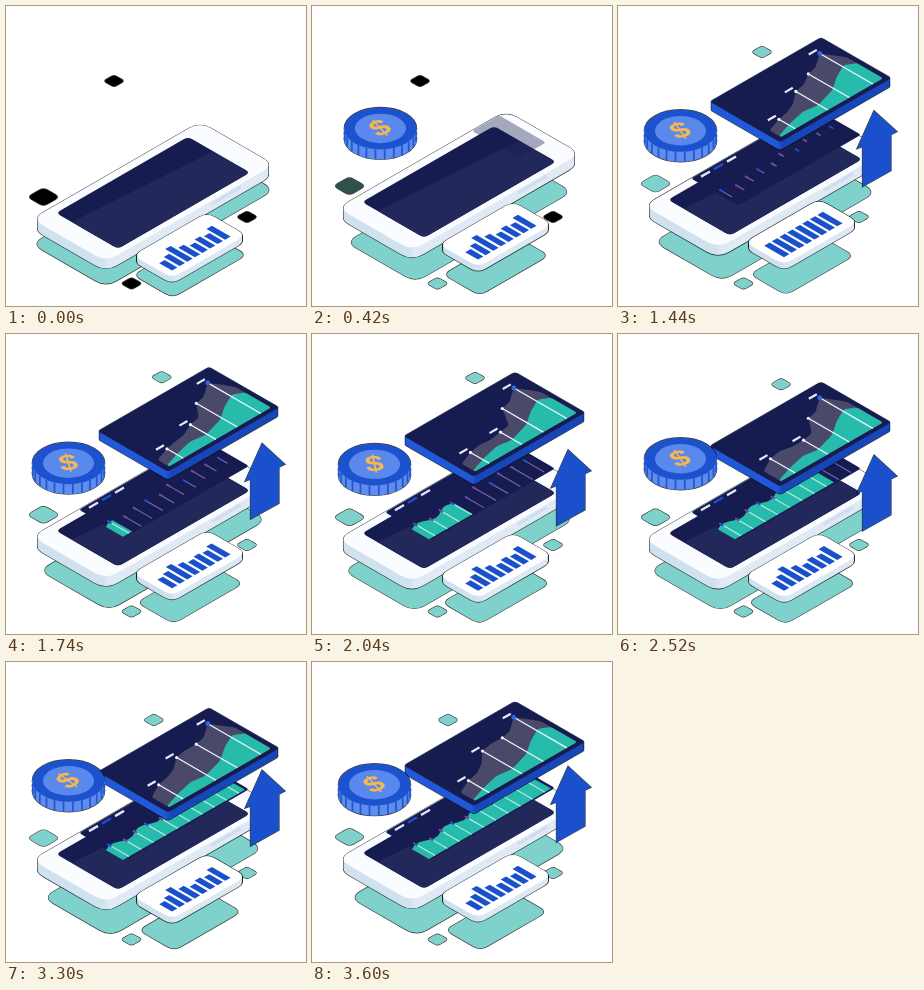
Animation of 300 by 300 pixels, one loop 3630 ms. Source, as an HTML page with a canvas:

```html
<!DOCTYPE html>
<html lang="en">
<head>
<meta charset="utf-8">
<title>Floating phone</title>
<style>
html, body { margin: 0; width: 100%; height: 100%; overflow: hidden; background: #fff; }
canvas { display: block; width: 300px; height: 300px; }
</style>
</head>
<body>
<canvas id="stage" width="300" height="300"></canvas>
<script>
const c = document.getElementById('stage').getContext('2d');
const LOOP = 3630, STEP = 30, K = 0.577;
const NAVY = '#171c50', BLUE = '#1b50cc', TEAL = '#7fd2cc', MINT = '#27bbab';

const seg = (t, a, b) => Math.min(1, Math.max(0, (t - a) / (b - a)));
const mix = (a, b, p) => a + (b - a) * p;
const wave = (t, peak, half) => 0.5 - 0.5 * Math.cos(Math.PI * (t - peak) / half);
const left = (t, a, b, n) => Math.pow(1 - seg(t, a, b), n);

// Isometric parallelogram from its left corner: a runs up-right, b runs down-right.
const iso = (x, y, a, b) => [
  [x, y], [x + a, y - a * K], [x + a + b, y - a * K + b * K], [x + b, y + b * K]
];

function trace(pts, r = 0, dy = 0) {
  const n = pts.length;
  c.beginPath();
  pts.forEach(([x, y], i) => {
    const toward = ([px, py]) => {
      const d = Math.hypot(px - x, py - y) || 1;
      return [x + (px - x) * r / d, y + dy + (py - y) * r / d];
    };
    const p = toward(pts[(i + n - 1) % n]), q = toward(pts[(i + 1) % n]);
    c.lineTo(...p);
    c.quadraticCurveTo(x, y + dy, ...q);
  });
  c.closePath();
}

function poly(pts, fill, r = 0, edge = false) {
  trace(pts, r);
  if (edge) outline();
  c.fillStyle = fill;
  c.fill();
}

function outline() {
  c.strokeStyle = 'rgba(0,0,0,.75)';
  c.lineWidth = 1.3;
  c.stroke();
}

function slab(pts, r, depth, top, sideL, sideR) {
  const split = pts[3][0], g = c.createLinearGradient(split - 3, 0, split + 3, 0);
  g.addColorStop(0, sideL);
  g.addColorStop(1, sideR);
  for (let d = depth; d >= 0; d--) { trace(pts, r, d); outline(); }
  c.fillStyle = g;
  for (let d = depth; d >= 0; d--) { trace(pts, r, d); c.fill(); }
  poly(pts, top, r);
}

function line(x1, y1, x2, y2, color, w) {
  c.strokeStyle = color;
  c.lineWidth = w;
  c.beginPath();
  c.moveTo(x1, y1);
  c.lineTo(x2, y2);
  c.stroke();
}

function at(x, y, draw) {
  c.save();
  c.translate(x, y);
  draw();
  c.restore();
}

// Smooth curve through [time, x, y] points.
function follow(t, k) {
  if (t <= k[0][0]) return k[0].slice(1);
  let i = 0;
  while (i < k.length - 2 && t > k[i + 1][0]) i++;
  const a = k[i], b = k[i + 1], z = k[i - 1] || a, e = k[i + 2] || b;
  const h = b[0] - a[0], p = seg(t, a[0], b[0]), p2 = p * p, p3 = p2 * p;
  return [1, 2].map(j => {
    const m = (b[j] - z[j]) / (b[0] - z[0]) * h;
    const n = (e[j] - a[j]) / (e[0] - a[0]) * h;
    return (2 * p3 - 3 * p2 + 1) * a[j] + (p3 - 2 * p2 + p) * m +
           (3 * p2 - 2 * p3) * b[j] + (p3 - p2) * n;
  });
}

function tile(t, x, y, w, start) {
  const p = seg(t, start, start + 210);
  const col = [127, 210, 204].map(v => Math.round(v * p));
  poly(iso(x - w, y, w, w), `rgb(${col})`, w * 0.3, true);
}

function shadow(cx, cy, a, b, s, r) {
  const w = a + b, h = (b - a) * K;
  poly(iso(cx - w * s / 2, cy - h * s / 2, a * s, b * s), TEAL, r, true);
}

function phone() {
  slab(iso(26, 213, 168, 74), 13, 10, '#fbfcff', '#d0e1ef', '#dfeaf5');
  line(206, 198, 235, 181, '#cfdeee', 3);
  const screen = iso(50, 207, 132, 62);
  poly(screen, NAVY, 5);
  c.save();
  trace(screen, 5);
  c.clip();
  poly([[66, 216], [206, 146], [246, 167], [112, 245]], '#23285a');
  c.restore();
}

function card(t) {
  slab(iso(127, 249.5, 74, 39), 9, 6, '#fff', '#cfe0ee', '#dce8f4');
  const rest = [0.58, 0.72, 1, 0.75, 0.58, 0.7, 0.62, 0.85];
  const even = Math.exp(-Math.pow((t - 1440) / 260, 2));
  rest.forEach((h, i) => {
    const len = 22 * mix(h, 0.9, even);
    poly(iso(166 + 7.6 * i - len, 264.5 - 4.4 * i - len * K, 5.4, len), BLUE);
  });
}

// Point on a chart: s along the base, h away from it.
const plot = (x, y, w, s, h) => [x + w * s - h, y - w * K * s - h * K];

function lowerChart(t) {
  const len = 123 * seg(t, 150, 1380);
  poly(iso(196 - len, 99 + len * K, len, 47), NAVY, 3);
  c.globalAlpha *= seg(t, 1020, 1380);
  [['#dfe6ff', 83, 168], [BLUE, 96, 160.5], ['#dfe6ff', 109, 153]].forEach(([col, x, y]) =>
    line(x, y, x + 9, y - 5.2, col, 2.4));
  const grow = seg(t, 1660, 2720);
  const pt = (s, h) => plot(117, 197, 122, s, h);
  const hill = s => 17 + 4 * s + 2.5 * Math.sin(s * 26);
  if (grow > 0) {
    const top = [];
    for (let i = 0; i <= 24; i++) top.push(pt(grow * i / 24, hill(grow * i / 24)));
    poly([pt(0, 0), ...top, pt(grow, 0)], MINT);
  }
  for (let i = 0; i < 10; i++) {
    const s = 0.05 + i * 0.1, h = hill(s) + 2, g = seg(t, 1100 + i * 40, 1700 + i * 40);
    const [x, y] = pt(s, h), [u, v] = pt(s, h * (1 - g));
    line(x, y, u, v, s < grow ? '#bdeee6' : '#7a68b0', 1.1);
    line(x, y, x + 4, y + 2.3, i % 3 ? '#70479f' : BLUE, 2);
  }
}

function panel(t) {
  slab(iso(92, 103.8, 111, 70), 3, 8, NAVY, '#2059d8', '#1646b8');
  const pt = (s, h) => plot(163, 139, 102, s, h);
  const h1 = mix(16, 27, wave(t, 1600, 1300));
  const h2 = mix(40, 21, wave(t, 860, 1300));
  const marks = [[0.14, h1], [0.46, h2], [0.67, 41], [0.9, 53]];
  const back = [[0, h1 * 0.7], marks[0], [0.24, h1 + 2], [0.34, mix(h1, h2, 0.4)], marks[1],
    [0.56, h2 + 2], marks[2], [0.76, 43], marks[3], [0.96, 43], [1, 36]];
  const front = [[0, 2], [0.15, 7], [0.32, 11], [0.45, 9], [0.65, 15], [0.78, 24], [0.92, 31], [1, 26]];
  const area = (list, col) =>
    poly([pt(0, 0), ...list.map(p => pt(...p)), pt(1, 0)], col, 2);
  area(back, '#4a4969');
  area(front, MINT);
  marks.forEach(([s, h], i) => {
    const [x, y] = pt(s, h);
    line(x, y, ...pt(s, 0), '#f4f7ff', 1.2);
    c.fillStyle = i === 3 ? '#2d67ea' : '#f4f7ff';
    c.beginPath();
    c.arc(x, y, i === 3 ? 2.4 : 1.6, 0, 7);
    c.fill();
    if (i !== 2) line(x - 11, y + 1, x - 3, y - 3.6, '#e8ecfa', 2.2);
  });
}

function ring(y, rx, ry, fill) {
  c.beginPath();
  c.ellipse(0, y, rx, ry, 0, 0, 7);
  if (fill) { c.fillStyle = fill; c.fill(); }
}

function coin(turn) {
  for (const y of [10, 5, 0]) { ring(y, 36.2, 21); outline(); }
  for (let y = 10; y > 0; y--) ring(y, 36.2, 21, '#5f8dee');
  for (let i = 0; i < 12; i++) {
    const a = 0.15 + i * 0.26, x = 36 * Math.cos(a), y = 21 * Math.sin(a);
    line(x, y, x, y + 10, '#2357d2', 1.8);
  }
  ring(0, 36.2, 21, '#1d52cf');
  ring(0, 25.5, 14.7, '#5a89ee');
  c.scale(1, 0.68);
  c.rotate(turn * Math.PI / 180);
  c.font = '700 33px "Liberation Sans", Arial, sans-serif';
  c.textAlign = 'center';
  c.textBaseline = 'middle';
  c.fillStyle = '#f8b84e';
  c.fillText('$', 0, 1);
}

function arrow() {
  poly([[256, 0], [279, 21], [273, 24], [273, 60], [244.5, 76], [244.5, 36], [239, 38]], BLUE, 0, true);
}

function draw(t) {
  c.clearRect(0, 0, 300, 300);
  const lift = t < 960
    ? 16 * (1 - left(t, 0, 960, 2))
    : mix(16, 7, wave(t, 960, 1320));
  const s = 1 - 0.1 * lift / 16;

  shadow(147, 211, 168, 74, s, 12);
  tile(t, ...follow(t, [[480, 108, 75], [960, 122, 62], [1440, 144, 46],
    [2040, 163, 44], [3000, 157, 57], [3600, 136, 58]]), 10.5, 550);
  tile(t, 37.5, 191 - lift, 16, 340);
  tile(t, 125.5, 277.5, 10.5, 120);

  at(0, -lift, phone);

  if (t > 300) {
    const r = left(t, 240, 900, 2);
    at(-17 * r, 16 - lift + 10 * r, () => {
      c.globalAlpha = seg(t, 300, 620);
      lowerChart(t);
    });
  }

  shadow(184, 259, 74, 39, s, 8);
  tile(t, 241, 211, 10.5, 990);
  at(0, -lift, () => card(t));

  if (t > 570) {
    const r = left(t, 570, 1500, 3);
    const y = t < 1500 ? 31 : mix(31, 50, wave(t, 1500, 1350));
    at(-35 * r, y - 39 + 40 * r, () => {
      c.globalAlpha = seg(t, 570, 780);
      panel(t);
    });
  }

  if (t > 600) {
    const y = mix(104, 121, t < 1290 ? 0 : wave(t, 1290, 1200));
    at(0, y + 40 * left(t, 600, 1250, 3), () => {
      c.globalAlpha = seg(t, 600, 840);
      arrow();
    });
  }

  if (t > 150) {
    const w = t < 840 ? 0 : wave(t, 840, 1140), r = left(t, 150, 840, 2);
    at(62.5 + 16 * r, mix(118, 130.5, w) + 12 * r, () => {
      c.globalAlpha = seg(t, 150, 360);
      coin(mix(-46, -8, w) + 35 * r);
    });
  }
}

const start = performance.now();
function tick() {
  const t = (performance.now() - start) % LOOP;
  draw(Math.floor(t / STEP) * STEP);
  requestAnimationFrame(tick);
}
tick();
</script>
</body>
</html>
```
